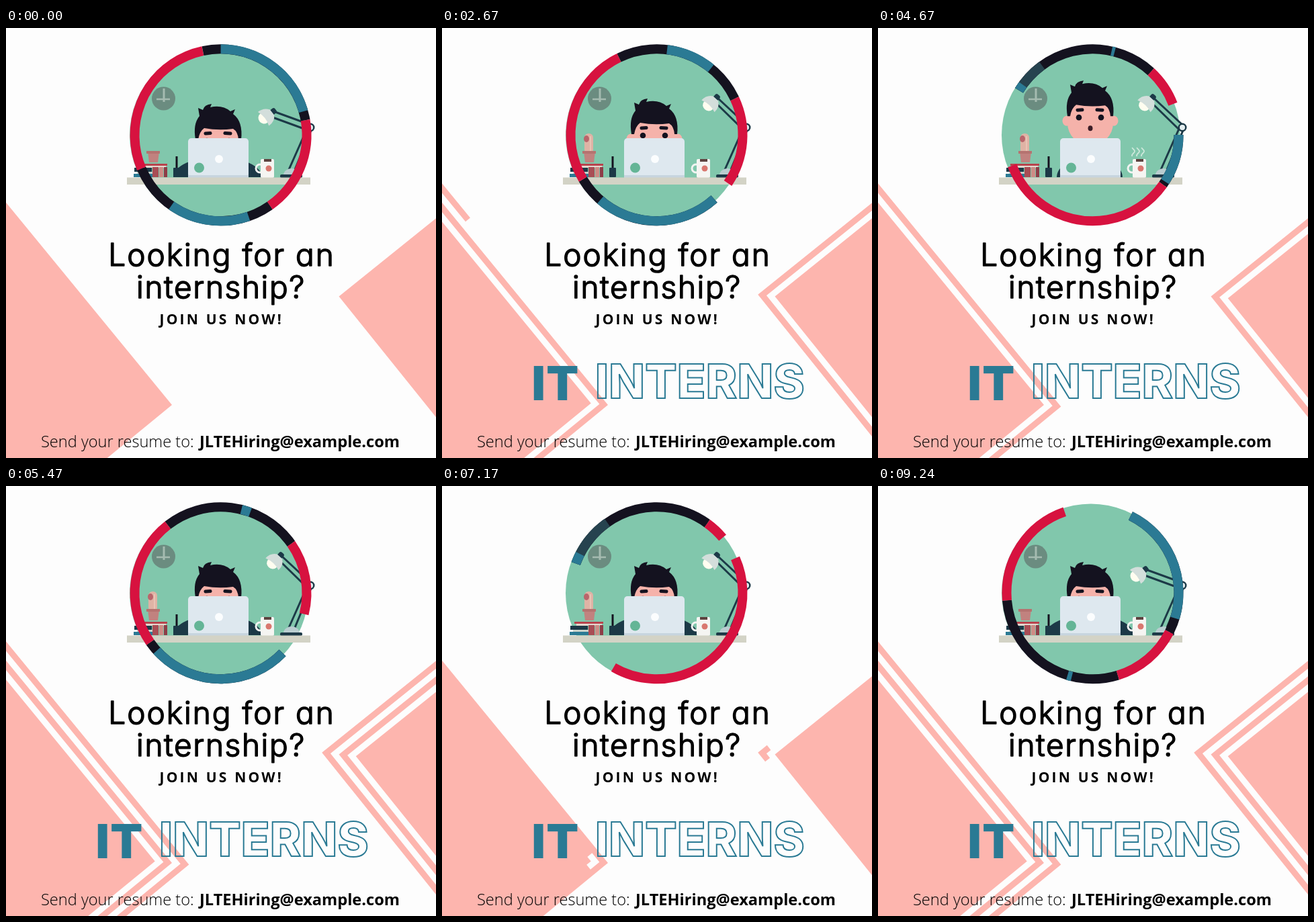
Recreate the animation shown at these times as an HTML page with a canvas. Size 640 px wide and 640 px high, loop 9.32 s.

```html
<!DOCTYPE html>
<html lang="en">
<head>
<meta charset="utf-8">
<title>Internship call</title>
<style>
  html, body { margin: 0; width: 100%; height: 100%; overflow: hidden; background: #fdfdfd; }
  canvas, svg { position: absolute; left: 0; top: 0; width: 640px; height: 640px; }
  text { white-space: pre; }
  .head { font: 300 46px Inter, Lato, sans-serif; font-feature-settings: "cv11"; font-optical-sizing: none;
    stroke: #000; stroke-width: 1.5; stroke-linejoin: round; text-anchor: middle; }
  .join { font: 700 21px "Open Sans", sans-serif; letter-spacing: 3.2px; text-anchor: middle; }
  .role { font: 800 70px Inter, sans-serif; font-optical-sizing: none; }
  .solid { font-weight: 900; letter-spacing: 1.5px; fill: #2a7a94; }
  .hollow { fill: none; stroke: #2a7a94; stroke-width: 2; letter-spacing: .3px; }
  .foot { font: 300 23.6px "Open Sans", sans-serif; }
  .foot.mail { font-weight: 700; }
</style>
</head>
<body>
<canvas id="stage" width="640" height="640"></canvas>
<svg viewBox="0 0 640 640">
  <text class="head" x="321" y="353.5" letter-spacing="2">Looking for an</text>
  <text class="head" x="320" y="401.5" letter-spacing="1.6">internship?</text>
  <text class="join" x="320.7" y="441">JOIN US NOW!</text>
  <g id="roles">
    <text class="role solid" x="133.5" y="554">IT</text>
    <text class="role hollow" x="228" y="550.5">INTERNS</text>
  </g>
  <text class="foot" x="52" y="623.5">Send your resume to:</text>
  <text class="foot mail" x="288" y="623.5">JLTEHiring@example.com</text>
</svg>
<script>
const ctx = document.getElementById('stage').getContext('2d');
const roles = document.getElementById('roles');
const LOOP = 9320, STRIPES = 3877, SPIN = 2930;
const PAPER = '#fdfdfd', PINK = '#fdb5ae', GREEN = '#81c7ac', INK = '#14121f',
  RED = '#d7123f', TEAL = '#2b7a94', NAVY = '#1c3947', SLATE = '#26434f', SKIN = '#f5b2aa';

const clamp = x => Math.max(0, Math.min(1, x));
const ramp = (t, a, b) => clamp((t - a) / (b - a));
const ease = (t, a, b) => { const x = ramp(t, a, b); return x * x * (3 - 2 * x); };
const mix = (a, b, k) => a + (b - a) * k;

function rect(x, y, w, h, fill, r = 0) {
  ctx.fillStyle = fill;
  ctx.beginPath();
  ctx.roundRect(x, y, w, h, r);
  ctx.fill();
}
function oval(x, y, rx, fill, ry = rx) {
  ctx.fillStyle = fill;
  ctx.beginPath();
  ctx.ellipse(x, y, rx, ry, 0, 0, 7);
  ctx.fill();
}
function line(points, color, width) {
  ctx.strokeStyle = color;
  ctx.lineWidth = width;
  ctx.beginPath();
  points.forEach(([x, y]) => ctx.lineTo(x, y));
  ctx.stroke();
}
function poly(points, fill) {
  ctx.fillStyle = fill;
  ctx.beginPath();
  points.forEach(([x, y]) => ctx.lineTo(x, y));
  ctx.fill();
}

// Corners of the two big squares; u and v point along their edges.
const corner = (x, y, deg, side) => {
  const c = Math.cos(deg * Math.PI / 180), s = Math.sin(deg * Math.PI / 180);
  return { x, y, u: [side * c, -s], v: [side * s, c] };
};
const left = corner(247, 561, 50.65, -1), right = corner(495.5, 399.5, 38.8, 1);
const ARM = 450;

function along(q, shift, du, dv) {
  return [q.x + q.u[0] * (shift + du) + q.v[0] * (shift + dv),
          q.y + q.u[1] * (shift + du) + q.v[1] * (shift + dv)];
}
function square(q) {
  poly([along(q, 0, 0, 0), along(q, 0, 700, 0), along(q, 0, 700, 700), along(q, 0, 0, 700)], PINK);
}
// Stripe along both edges, visible between distances lo and hi from the tip.
function stripe(q, shift, color, lo, hi) {
  if (hi - lo < 0.5) return;
  if (lo <= 0) return line([along(q, shift, hi, 0), along(q, shift, 0, 0), along(q, shift, 0, hi)], color, 9);
  line([along(q, shift, lo, 0), along(q, shift, hi, 0)], color, 9);
  line([along(q, shift, 0, lo), along(q, shift, 0, hi)], color, 9);
}
function background(t) {
  const p = t % STRIPES, run = start => ARM * ramp(p, start, start + 385);
  const first = [run(2364), run(375)];
  const second = [ARM - run(760), ARM - run(2920)];
  square(left);
  square(right);
  stripe(left, -13.5, PINK, ...first);
  stripe(right, 13.5, PAPER, ...first);
  stripe(left, 13.5, PAPER, ...second);
  stripe(right, -13.5, PINK, ...second);
}

// Ring arcs: colour, index of the first key time, then start and end degrees per key.
const KEYS = [0, 1230, 1360, 1620, 2070, 2630, 2720, 2930];
const ARCS = [
  [INK, 0, 290, 396, 322, 415, 334, 425, 348, 440, 386, 477, 483, 483],
  [INK, 0, 66, 66, 134, 235, 138, 239, 145, 247, 163, 265, 175, 317, 202, 339, 290, 396],
  [RED, 0, 66, 210, 235, 322, 239, 334, 247, 348, 265, 341, 317, 317],
  [RED, 0, 396, 410, 415, 464, 425, 484, 440, 505, 477, 523, 483, 535, 468, 562, 426, 570],
  [RED, 6, 352, 352, 396, 410],
  [TEAL, 0, 372, 372, 374, 380, 367, 399, 360, 434, 386, 467, 483, 483],
  [TEAL, 0, 66, 66, 134, 228, 138, 221, 161, 215, 194, 197, 197, 197],
  [TEAL, 4, 341, 341, 317, 340, 339, 352, 396, 396],
  [SLATE, 0, 290, 325, 322, 322],
  [SLATE, 6, 202, 202, 290, 325],
  [TEAL, 0, 290, 297, 322, 322],
  [TEAL, 6, 202, 202, 290, 297]
];
function ring(t) {
  const p = (t - 1310 + SPIN) % SPIN;
  let i = 0;
  while (i < 6 && p >= KEYS[i + 1]) i++;
  const k = ramp(p, KEYS[i], KEYS[i + 1]);
  for (const [color, from, ...deg] of ARCS) {
    const n = (i - from) * 2;
    if (n < 0 || n + 3 >= deg.length) continue;
    const a = mix(deg[n], deg[n + 2], k), b = mix(deg[n + 1], deg[n + 3], k);
    if (b - a < 0.3) continue;
    ctx.strokeStyle = color;
    ctx.lineWidth = 14;
    ctx.beginPath();
    ctx.arc(319.5, 159.3, 128, (a - 90) * Math.PI / 180, (b - 90) * Math.PI / 180);
    ctx.stroke();
  }
}

function lamp(up, grow) {
  const x = mix(398, 409, up), y = mix(124, 103, up), s = 0.85 + grow;
  line([[455, 150], [429, 213]], NAVY, 3);
  line([[448, 150], [420, 213]], NAVY, 3);
  line([[x, y], [453, 144]], NAVY, 3);
  line([[x - 1, y + 9], [449, 152]], NAVY, 3);
  oval(453, 148, 6.5, NAVY);
  oval(453, 148, 4, '#e4eef0');
  ctx.fillStyle = '#b9cdd0';
  ctx.beginPath();
  ctx.ellipse(425, 219, 12, 10, 0, Math.PI, 0);
  ctx.fill();
  rect(408, 218, 33, 5, NAVY, 2);

  ctx.save();
  ctx.translate(x, y);
  ctx.rotate(mix(0.9, 0.75, up));
  ctx.scale(s, s);
  rect(-5, -5, 10, 11, NAVY, 3);
  oval(-1, 21, 10, '#fffdf0', 9);
  ctx.fillStyle = grow > 0.3 ? '#e3dfd0' : '#d3dedb';
  ctx.beginPath();
  ctx.moveTo(-6, 3);
  ctx.quadraticCurveTo(-16, 9, -16, 22);
  ctx.quadraticCurveTo(0, 16, 15, 22);
  ctx.quadraticCurveTo(16, 9, 6, 3);
  ctx.fill();
  ctx.restore();
}

function shelf(up) {
  oval(234.5, 105, 17.5, '#6b8c80');
  line([[235, 90], [235, 110]], '#a5bbb0', 3);
  line([[224, 106], [244, 106]], '#a5bbb0', 2.5);

  if (up > 0.02) {
    ctx.save();
    ctx.translate(219, 185);
    ctx.scale(1, up);
    rect(-7, -28, 13, 30, '#dfb3a5', 6);
    oval(-4, -20, 4, '#b9656b', 5);
    line([[2, -24], [2, -2]], '#edcabd', 1.5);
    ctx.restore();
  }
  poly([[211, 184], [228, 184], [226, 200], [213, 200]], '#c1827f');
  rect(209, 183, 20, 4, '#b57370');
  rect(197, 202, 43, 3, '#b8434d');
  rect(200, 205, 38, 3, '#e4d8cf');
  rect(191, 208, 26, 6, NAVY);
  rect(195, 214, 24, 3, '#c9d3cb');
  rect(190, 217, 28, 5, TEAL);
  rect(218, 207, 9, 15, '#a94d55');
  rect(228, 207, 6, 15, '#ce8c86');
  rect(235, 207, 5, 15, '#8e3d48');
  line([[254, 191], [254, 212]], INK, 3);
  rect(249, 208, 10, 14, NAVY, 1);
}

function person(drop, hunch) {
  ctx.save();
  ctx.beginPath();
  ctx.rect(180, 20, 280, 202);
  ctx.clip();
  oval(315, 222, 42 + 24 * hunch, NAVY, 30);
  poly([[300, 160 + drop * 0.6], [333, 160 + drop * 0.6], [345, 222], [288, 222]], NAVY);

  ctx.translate(0, drop);
  oval(281, 124, 6.5, SKIN, 7.5);
  oval(351, 124, 6.5, SKIN, 7.5);
  rect(282, 82, 68, 79, SKIN, 34);
  ctx.fillStyle = INK;
  ctx.beginPath();
  ctx.moveTo(282, 117);
  ctx.quadraticCurveTo(278, 94, 288, 82);
  ctx.lineTo(286, 70);
  ctx.lineTo(293, 73);
  ctx.quadraticCurveTo(295, 65, 306, 64);
  ctx.lineTo(304, 69);
  ctx.quadraticCurveTo(322, 65, 334, 75);
  ctx.lineTo(341, 72);
  ctx.lineTo(338, 79);
  ctx.quadraticCurveTo(353, 90, 350, 117);
  ctx.lineTo(346, 117);
  ctx.quadraticCurveTo(345, 105, 338, 101);
  ctx.quadraticCurveTo(316, 104, 295, 100);
  ctx.quadraticCurveTo(288, 105, 286, 117);
  ctx.fill();
  ctx.lineCap = 'round';
  line([[297, 108], [304, 107.5]], INK, 5);
  line([[326, 107.5], [334, 108]], INK, 5);
  ctx.lineCap = 'butt';
  oval(299, 119, 4.3, INK);
  oval(332, 119, 4.3, INK);
  oval(316, 135, 3.5, '#3b1c26', 4);
  ctx.restore();
}

function desk(t, steam) {
  rect(271, 164, 90, 59, '#dee8ef', 5);
  rect(271, 219, 90, 4, '#c7d5df');
  oval(317, 195, 6, '#fbfdfe');
  oval(287.5, 208, 7.5, '#64b596');

  ctx.strokeStyle = '#f2f4f2';
  ctx.lineWidth = 3;
  ctx.beginPath();
  ctx.arc(378, 209, 6, 0, 7);
  ctx.stroke();
  rect(379, 195, 20, 28, '#f5f5f2', 2);
  rect(384, 195, 11, 4, '#5d4440');
  oval(391, 209, 4.5, '#d9776f');
  if (steam > 0) {
    ctx.globalAlpha = steam;
    for (let i = 0; i < 3; i++) {
      const x = 380 + i * 7, wave = [];
      for (let y = 0; y <= 13; y++) wave.push([x + 2 * Math.sin(y / 2 + t / 160), 191 - y]);
      line(wave, '#eef6f0', 1.8);
    }
    ctx.globalAlpha = 1;
  }
  rect(180, 222.5, 273, 10.5, '#d3d3c6');
}

function draw(t) {
  const p = t % SPIN;
  const up = ease(p, 1030, 1090) - ease(p, 2720, 2900);
  const grow = ramp(p, 1030, 1090) - ramp(p, 1120, 1250);
  const down = ease(t, 4600, 4800);
  const peek = ease(t, 2550, 2660) * (1 - down), rise = ease(t, 3000, 3200) * (1 - down);

  ctx.fillStyle = PAPER;
  ctx.fillRect(0, 0, 640, 640);
  background(t);
  oval(316.8, 159.3, 132.8, GREEN);
  shelf(up);
  lamp(up, grow);
  person(49 - 8 * peek - 41 * rise, 1 - peek);
  desk(t, rise);
  ring(t);
  roles.setAttribute('opacity', ease(t, 250, 700));
}

const begin = performance.now();
function tick(now) {
  draw(Math.max(0, now - begin) % LOOP);
  requestAnimationFrame(tick);
}
draw(0);
requestAnimationFrame(tick);
</script>
</body>
</html>
```
